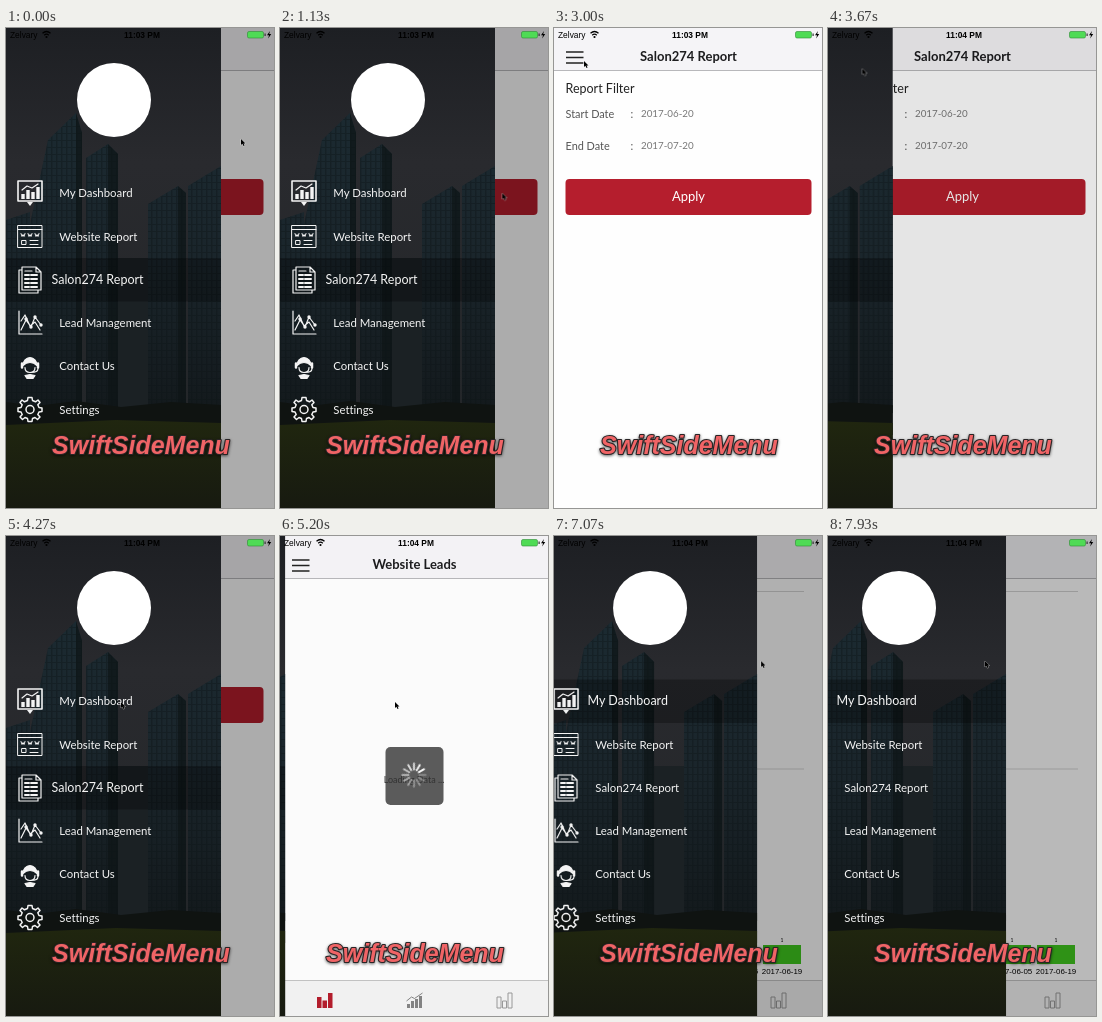
An HTML page that plays this animation: 268x480 px, repeating every 8000 ms.

```html
<!DOCTYPE html>
<html lang="en">
<head>
<meta charset="utf-8">
<title>Side menu</title>
<style>
/* Share of the side menu that is open, 0 to 1 */
@property --open { syntax: "<number>"; inherits: true; initial-value: 1; }

html, body { margin: 0; width: 100%; height: 100%; overflow: hidden; background: #fff; }
svg { display: block; width: 100vw; height: 100vh; animation: slide 8s linear infinite; }
text { font-family: Lato, "Open Sans", sans-serif; font-variant-ligatures: none; }
.mid { text-anchor: middle; }

.menu { transform: translateX(calc((var(--open) - 1) * 215px)); }
.dim { opacity: calc(var(--open) * .32); }
@keyframes slide {
  0%, 25.9% { --open: 1; }
  26.625% { --open: .951; }
  30% { --open: .45; animation-timing-function: ease-out; }
  34.4% { --open: 0; }
  42.75% { --open: 0; animation-timing-function: ease-in-out; }
  51%, 57.8% { --open: 1; animation-timing-function: ease-in-out; }
  65.9%, 83.5% { --open: 0; animation-timing-function: ease-out; }
  88.375% { --open: .944; }
  90%, 94.6% { --open: 1; }
  99.1%, 100% { --open: .828; }
}

.cursor { animation: point 8s linear infinite; }
@keyframes point {
  0%, .6% { transform: translate(235px, 111px); }
  2.5% { transform: translate(250px, 99px); }
  5% { transform: translate(207px, 122px); }
  8% { transform: translate(250px, 150px); }
  10.9%, 11.4% { transform: translate(236px, 176px); }
  13.5% { transform: translate(219px, 155px); }
  16% { transform: translate(232px, 195px); }
  19.1%, 25.9% { transform: translate(247px, 221px); }
  26.625% { transform: translate(238px, 222px); }
  30% { transform: translate(128px, 217px); animation-timing-function: ease-in-out; }
  36.6%, 37.6% { transform: translate(30px, 33px); }
  39%, 44% { transform: translate(27px, 29px); animation-timing-function: ease-in-out; }
  53.3%, 68.5% { transform: translate(115px, 166px); animation-timing-function: ease-in-out; }
  74.1%, 83.5% { transform: translate(24px, 24px); animation-timing-function: ease-out; }
  88.375% { transform: translate(207px, 125px); }
  90.5%, 92% { transform: translate(222px, 127px); }
  94.6% { transform: translate(194px, 126px); }
  99.1%, 100% { transform: translate(157px, 125px); }
}

/* Hard swaps between states */
.swap > * { animation: 8s step-end infinite; }
.clock > :first-child { animation-name: clock-off; }
.clock > :last-child { animation-name: clock-on; }
.page > :first-child { animation-name: page-off; }
.page > :last-child { animation-name: page-on; }
.chosen > :first-child { animation-name: chosen-off; }
.chosen > :last-child { animation-name: chosen-on; }
.data > :first-child { animation-name: data-off; }
.data > :last-child { animation-name: data-on; }
@keyframes clock-off { 0% { opacity: 1; } 38%, 100% { opacity: 0; } }
@keyframes clock-on { 0% { opacity: 0; } 38%, 100% { opacity: 1; } }
@keyframes page-off { 0% { opacity: 1; } 57.9%, 100% { opacity: 0; } }
@keyframes page-on { 0% { opacity: 0; } 57.9%, 100% { opacity: 1; } }
@keyframes chosen-off { 0% { opacity: 1; } 66.5%, 100% { opacity: 0; } }
@keyframes chosen-on { 0% { opacity: 0; } 66.5%, 100% { opacity: 1; } }
@keyframes data-off { 0% { opacity: 1; } 75.6%, 100% { opacity: 0; } }
@keyframes data-on { 0% { opacity: 0; } 75.6%, 100% { opacity: 1; } }

.spinner { animation: spin 1s steps(12) infinite; }
@keyframes spin { to { transform: rotate(360deg); } }

.title { font-size: 13px; font-weight: 700; fill: #1d1d1f; text-anchor: middle; }
.field { font-size: 10.9px; fill: #555; }
.value { font-size: 9.8px; fill: #777; }
.item { font-size: 11.4px; fill: #f4f4f4; }
.item.big { font-size: 12.5px; }
.icons { fill: none; stroke: #f4f4f4; stroke-width: 1.2; stroke-linejoin: round; stroke-linecap: round; }
.status text { font-family: "Liberation Sans", Arial, sans-serif; font-size: 8.4px; }
.chart { font-size: 7.9px; text-anchor: middle; }
.chart text { font-family: "Liberation Sans", Arial, sans-serif; }
.count { font-size: 5px; }
.caption {
  font: italic bold 25px "Liberation Sans", Arial, sans-serif;
  fill: #f06466; stroke: #292425; stroke-width: 2.2px; stroke-linejoin: round; paint-order: stroke;
  text-anchor: middle; filter: drop-shadow(0 1px 1.5px rgba(0, 0, 0, .6));
}
</style>
</head>
<body>
<svg viewBox="0 0 268 480" preserveAspectRatio="none">
  <defs>
    <linearGradient id="sky" x2="0" y2="1">
      <stop offset="0" stop-color="#1d1f23"/><stop offset=".28" stop-color="#292a2e"/>
      <stop offset=".8" stop-color="#232629"/>
    </linearGradient>
    <linearGradient id="glass" x2="0" y2="1">
      <stop offset="0" stop-color="#1b2a31"/><stop offset=".5" stop-color="#1a252b"/>
      <stop offset="1" stop-color="#13191c"/>
    </linearGradient>
    <linearGradient id="grass" x2="0" y2="1">
      <stop offset="0" stop-color="#20260f"/><stop offset="1" stop-color="#171a10"/>
    </linearGradient>
    <pattern id="panes" width="5" height="7" patternUnits="userSpaceOnUse">
      <path d="M0 0h1.500v7H0zM0 0h5v1H0z" fill="#0c1316" opacity=".4"/>
    </pattern>
    <path id="towers" d="M0 192l24-8V385H0zM24 196l18-84 28-27 6 20v280H24zM80 130l22-14 10 10v259H80zM142 176l30-18 8 7v220h-38zM182 158l33-20v247h-33z"/>
    <path id="spoke" d="M0-5.500V-11.500" stroke-width="1.900" stroke-linecap="round"/>
    <g id="bar"><path d="M-19 409h38v19h-38z" fill="#40c81f"/><text class="count" y="406">1</text></g>
    <g id="nav">
      <path d="M0 0h268v42H0z" fill="#f5f4f7"/>
      <path d="M0 42.500h268" stroke="#b8b8bb"/>
      <path d="M12 24h17.500M12 29.500h17.500M12 35h17.500" stroke="#222" stroke-width="1.600"/>
    </g>
  </defs>

  <g class="swap page">
    <g>
      <path d="M0 0h268v480H0z" fill="#fefefe"/>
      <use href="#nav"/>
      <text class="title" x="134.500" y="33">Salon274 Report</text>
      <text x="11.500" y="65" font-size="12.500" fill="#222">Report Filter</text>
      <g class="field">
        <text x="11.500" y="90">Start Date</text><text x="76.500" y="90">:</text>
        <text x="11.500" y="122">End Date</text><text x="76.500" y="122">:</text>
      </g>
      <g class="value">
        <text x="87" y="89">2017-06-20</text><text x="87" y="121">2017-07-20</text>
      </g>
      <rect x="11.500" y="151" width="246" height="36" rx="4" fill="#b51e2d"/>
      <text class="mid" x="134.500" y="173" font-size="13" fill="#fff">Apply</text>
    </g>
    <g>
      <path d="M0 0h268v480H0z" fill="#fdfdfd"/>
      <use href="#nav"/>
      <text class="title" x="134.500" y="33">Website Leads</text>
      <g class="swap data">
        <g>
          <rect x="105.500" y="211" width="58" height="58" rx="5" fill="#5c5c5c"/>
          <text class="mid" x="134" y="247" font-size="9" fill="#333">Loading Data ...</text>
          <g transform="translate(134 239)"><g class="spinner" stroke="#fff">
            <use href="#spoke"/>
            <use href="#spoke" transform="rotate(30)" opacity=".3"/>
            <use href="#spoke" transform="rotate(60)" opacity=".32"/>
            <use href="#spoke" transform="rotate(90)" opacity=".35"/>
            <use href="#spoke" transform="rotate(120)" opacity=".4"/>
            <use href="#spoke" transform="rotate(150)" opacity=".46"/>
            <use href="#spoke" transform="rotate(180)" opacity=".53"/>
            <use href="#spoke" transform="rotate(210)" opacity=".6"/>
            <use href="#spoke" transform="rotate(240)" opacity=".68"/>
            <use href="#spoke" transform="rotate(270)" opacity=".76"/>
            <use href="#spoke" transform="rotate(300)" opacity=".85"/>
            <use href="#spoke" transform="rotate(330)" opacity=".94"/>
          </g></g>
        </g>
        <g class="chart">
          <path d="M20 55.500h230M20 233h230" stroke="#c8c8c8" stroke-width=".8"/>
          <use href="#bar" x="52"/><use href="#bar" x="96"/><use href="#bar" x="140"/>
          <use href="#bar" x="184"/><use href="#bar" x="228"/>
          <text x="52" y="438">2017-04-24</text><text x="96" y="438">2017-05-08</text>
          <text x="140" y="438">2017-05-22</text><text x="184" y="438">2017-06-05</text>
          <text x="228" y="438">2017-06-19</text>
        </g>
      </g>
      <path d="M0 444h268v36H0z" fill="#f3f3f3"/>
      <path d="M0 444.500h268" stroke="#c4c4c4"/>
      <path d="M37 461h4.500v11H37zM42.500 464.500H47v7.500h-4.500zM48 457h4.500v15H48z" fill="#b51e2d"/>
      <path d="M127 468h3v4h-3zM131 465h3v7h-3zM135 463h3v9h-3zM139 460h3v12h-3z" fill="#858585"/>
      <path d="M126.500 465l5-4 3 1.500 8-5.500" fill="none" stroke="#858585"/>
      <path d="M217 461h4v11h-4zM222.500 465h4v7h-4zM228 457h4v15h-4z" fill="none" stroke="#9a9a9a"/>
    </g>
  </g>

  <path class="dim" d="M0 0h268v480H0z"/>

  <g class="menu">
    <path d="M0 0h215v480H0z" fill="url(#sky)"/>
    <path d="M112 230h30v155h-30z" fill="#1b2124"/>
    <use href="#towers" fill="url(#glass)"/>
    <use href="#towers" fill="url(#panes)"/>
    <path d="M70 85l6 20v280h-6zM102 116l10 10v259h-10zM172 158l8 7v220h-8z" fill="#0e1416" opacity=".7"/>
    <path d="M0 374l30 4 40-5 45 6 50-5 50 3v30H0z" fill="#0f1311"/>
    <path d="M0 397l110-5 105 3v85H0z" fill="url(#grass)"/>
    <circle cx="108" cy="72" r="37" fill="#fff"/>

    <g class="swap chosen">
      <g>
        <path d="M0 230h215v43.500H0z" opacity=".28"/>
        <text class="item" x="53.300" y="169">My Dashboard</text>
        <text class="item big" x="45.500" y="256">Salon274 Report</text>
      </g>
      <g>
        <path d="M0 143.500h215V187H0z" opacity=".28"/>
        <text class="item big" x="45.500" y="169">My Dashboard</text>
        <text class="item" x="53.300" y="256">Salon274 Report</text>
      </g>
    </g>
    <g class="item">
      <text x="53.300" y="212.500">Website Report</text>
      <text x="53.300" y="299">Lead Management</text>
      <text x="53.300" y="342">Contact Us</text>
      <text x="53.300" y="385.500">Settings</text>
    </g>
    <g class="icons">
      <g transform="translate(24 165)">
        <path d="M-12-12h24V8H-12z" stroke-width="1.600"/>
        <path d="M-7 6V1M-2 6V-3M3 6V-1M8 6V-6" stroke-width="3.400" stroke-linecap="butt"/>
        <path d="M-8-3l5-4 5 2 6-4"/>
        <path d="M-3 9h6l-3 4z" fill="#f4f4f4" stroke="none"/>
      </g>
      <g transform="translate(24 208.500)">
        <path d="M-12-11h24v22h-24zM-12-7h24M-9-3l1 3 1-2 1 2 1-3M-2-3l1 3 1-2 1 2 1-3M5-3l1 3 1-2 1 2 1-3M-8 4h4v4h-4zM0 4h8M0 8h8" stroke-width="1"/>
      </g>
      <g transform="translate(24 252)">
        <path d="M-8-13H6l5 5v18H-8zM-8-10h-3v23H8v-3M6-13v5h5M-5-9h7"/>
        <path d="M-5-5h4M1-5h6M-5-1h4M1-1h6M-5 3h4M1 3h6M-5 7h4M1 7h6" stroke-width="2"/>
      </g>
      <g transform="translate(24 295)">
        <path d="M-11-12v23h23M-9 7l5-10 5 7 4-10 6 8M-9-2l4-6 5 11 5-4 5 8"/>
        <g fill="#f4f4f4" stroke="none"><circle cx="-4" cy="-4" r="1.700"/><circle cx="1" cy="4" r="1.700"/><circle cx="5" cy="-6" r="1.700"/><circle cx="11" cy="2" r="1.700"/></g>
      </g>
      <g transform="translate(24 338.500)">
        <path d="M-7-1a7 8 0 0 1 14 0q-3-3-7-3t-7 3z" fill="#f4f4f4"/>
        <path d="M-8-3v4M8-3v4" stroke-width="2.500"/>
        <path d="M-5 1q0 5 5 5t5-5M8 2q0 4-7 4"/>
        <path d="M-5 9l5-1 5 1-2 3h-6z" fill="#f4f4f4"/>
      </g>
      <g transform="translate(24 381.500)" stroke-width="1.500">
        <path d="M-2.500-9l.5-3h4l.5 3 3 1.300L8-9.500 10-7 7.800-4.700 9-2l3 .4v3.500L9 2.500 7.800 5 10 7.500 7.500 10 5 8 2.500 9 2 12h-4l-.5-3L-5 8l-2.500 2L-10 7.500-7.800 5-9 2.500l-3-.6v-3.500L-9-2l1.200-2.700L-10-7l2-2.500 2.500 1.800z"/>
        <circle r="4"/>
      </g>
    </g>
  </g>

  <g class="status">
    <text x="4" y="9.500">Zelvary</text>
    <g fill="none" stroke="#000" stroke-width="1.200">
      <path d="M36.500 5.300q4-3.600 8 0M38.200 7.200q2.300-2 4.600 0"/>
      <circle cx="40.500" cy="9" r=".5"/>
    </g>
    <g class="swap clock mid" font-weight="bold">
      <text x="136" y="9.500">11:03 PM</text>
      <text x="136" y="9.500">11:04 PM</text>
    </g>
    <rect x="241.500" y="3.500" width="16" height="6.500" rx="1.500" fill="#4fdb55" stroke="#2e8c35" stroke-width=".6"/>
    <path d="M258.500 5.500h1.200v2.500h-1.200z" fill="#333"/>
    <path d="M264 3l-3 4.200h2l-.8 3.200 3-4.400h-2z"/>
  </g>

  <text class="caption" x="135" y="425.500">SwiftSideMenu</text>

  <path class="cursor" d="M0 0v6l1.400-1.200 1.100 2.300 1.100-.5-1.100-2.200h2z" stroke="#fff" stroke-width=".5" paint-order="stroke"/>
</svg>
</body>
</html>
```
